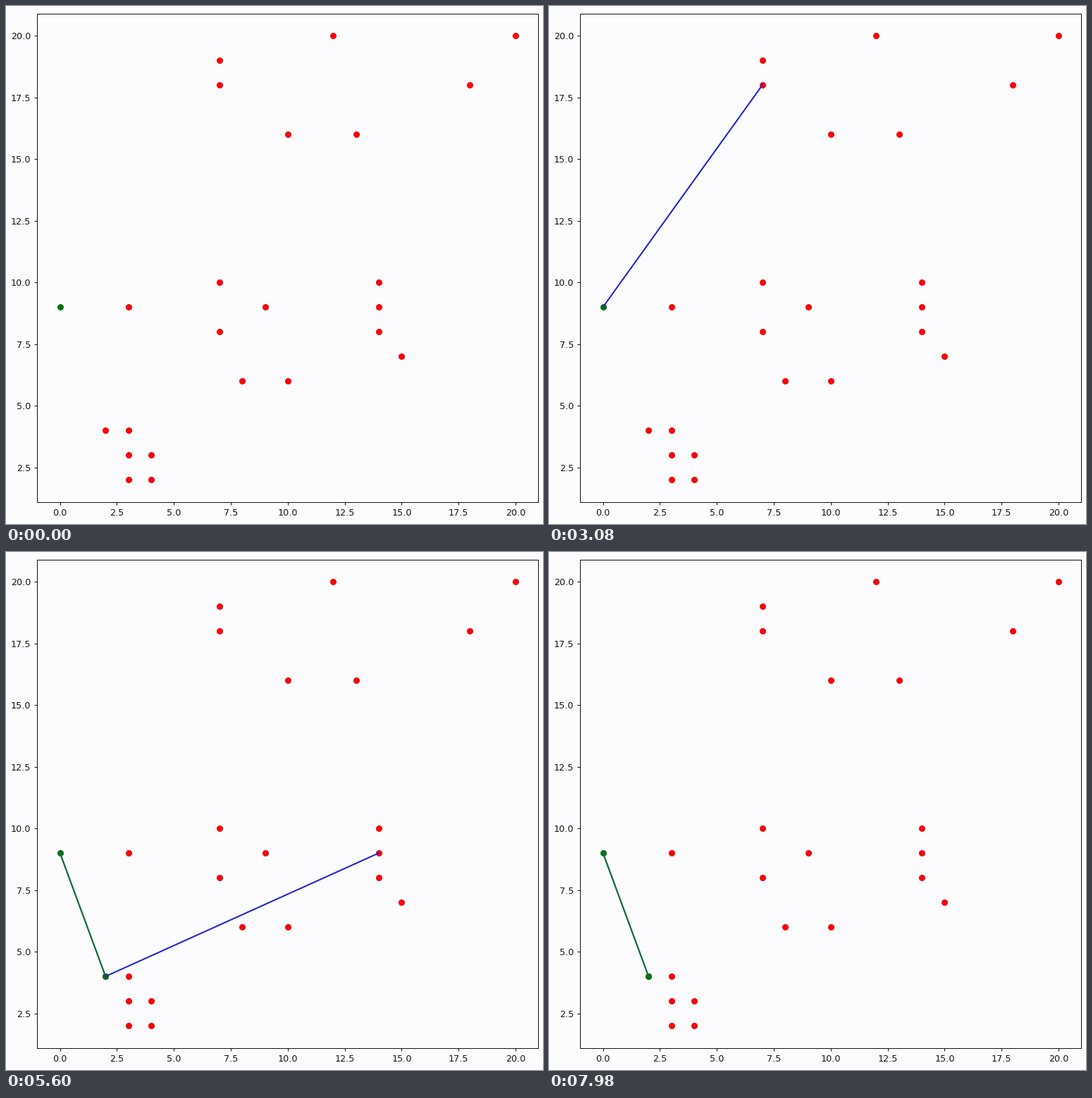
A matplotlib script that plays this animation: 762x735 px, repeating every 8000 ms.

```python
import matplotlib.pyplot as plt
from matplotlib.animation import FuncAnimation

W, H, DPI = 762, 735, 96
LEFT, RIGHT, TOP, BOTTOM = 44.3, 755.4, 10.5, 703.7
SCALE = 0.9555
STEP, LOOP = 40, 8000
BACK, INK = "#fcfcfe", "#141414"
RED, GREEN, BLUE = "#f4060a", "#08720c", "#2020d4"

plt.rcParams["font.family"] = "DejaVu Sans"

CITIES = [(2, 4), (3, 4), (3, 3), (4, 3), (3, 2), (4, 2), (3, 9), (7, 8),
          (7, 10), (8, 6), (10, 6), (9, 9), (14, 8), (14, 9), (14, 10),
          (15, 7), (10, 16), (13, 16), (7, 18), (7, 19), (12, 20),
          (18, 18), (20, 20)]
START, NEXT = (0, 9), (2, 4)

# Candidate edges blink on a steady beat: half a period shown, half cleared.
CANDIDATES = [(14, 8), (7, 10), (13, 16), (7, 18), NEXT,
              (7, 19), (14, 9), (12, 20), (18, 18)]
FIRST, PERIOD = 208, 866
ACCEPT = FIRST + (CANDIDATES.index(NEXT) + 0.5) * PERIOD

fig = plt.figure(figsize=(W / DPI, H / DPI), dpi=DPI, facecolor=BACK)
ax = fig.add_axes([LEFT / W, 1 - BOTTOM / H,
                   (RIGHT - LEFT) / W, (BOTTOM - TOP) / H], facecolor=BACK)
ax.set(xlim=(-1, 21), ylim=(1.1, 20.9))
for axis, first in ((ax.xaxis, 0), (ax.yaxis, 1)):
    axis.set_ticks([2.5 * i for i in range(first, 9)])
    axis.set_major_formatter("{x:.1f}")
ax.tick_params(labelsize=10 * SCALE, length=3.5 * SCALE, width=0.8 * SCALE,
               pad=3.5 * SCALE, color=INK, labelcolor=INK)
for spine in ax.spines.values():
    spine.set(linewidth=0.8 * SCALE, color=INK)


def dots(points, color, zorder):
    return ax.plot(*zip(*points), "o", ms=6.1 * SCALE, mew=SCALE,
                   color=color, zorder=zorder)[0]


def edge(ends, color, width, zorder):
    return ax.plot(*zip(*ends), color=color, lw=width * SCALE,
                   zorder=zorder)[0]


dots(CITIES, RED, 2)
dots([START], GREEN, 3)
visited = dots([NEXT], GREEN, 3)
route = edge([START, NEXT], "#0c6c3a", 1.75, 4)
trial = edge([START, NEXT], BLUE, 1.6, 5)


def update(frame):
    t = frame * STEP
    accepted = t >= ACCEPT
    visited.set_visible(accepted)
    route.set_visible(accepted)

    index, phase = divmod(t - FIRST, PERIOD)
    shown = 0 <= index < len(CANDIDATES) and phase < PERIOD / 2
    trial.set_visible(shown)
    if shown:
        trial.set_data(*zip(NEXT if accepted else START,
                            CANDIDATES[int(index)]))
    return visited, route, trial


anim = FuncAnimation(fig, update, frames=LOOP // STEP, interval=STEP,
                     repeat=True, repeat_delay=0)
plt.show()
```
